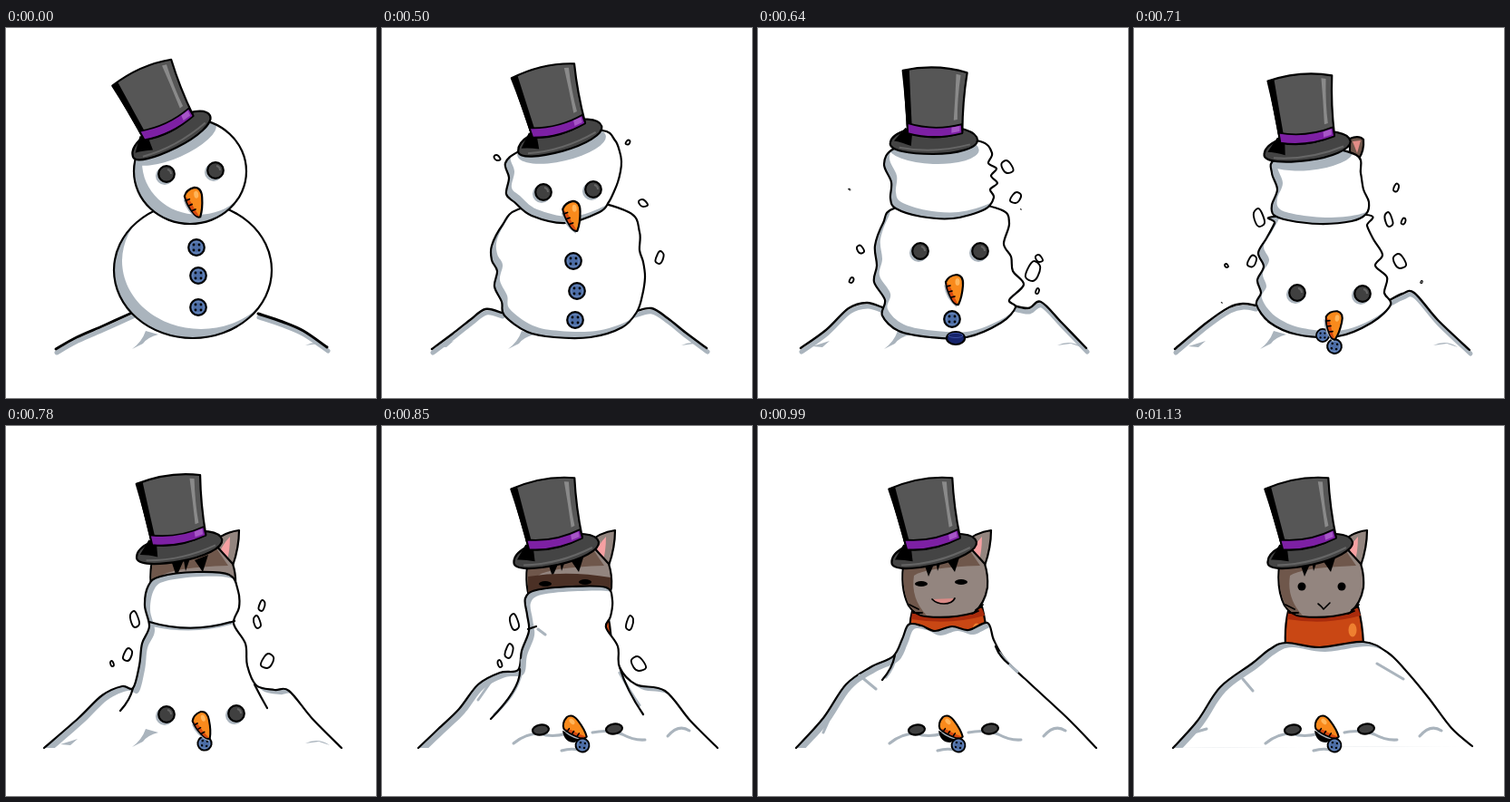
These frames come from a looping animation (408x408 px, 2130 ms). An HTML page:

```html
<!DOCTYPE html>
<html lang="en">
<head>
<meta charset="utf-8">
<title>Melting snowman</title>
<style>
  html, body { margin: 0; width: 100%; height: 100%; overflow: hidden; background: #fff; }
  #stage { width: 408px; height: 408px; overflow: hidden; }
  #strip { display: block; animation: melt 2130ms step-end infinite; }
  /* poses lie side by side: long hold, nine quick steps, long hold */
  @keyframes melt {
    0% { transform: translateX(0); }
    23.4742% { transform: translateX(-408px); }
    26.7606% { transform: translateX(-816px); }
    30.0469% { transform: translateX(-1224px); }
    33.3333% { transform: translateX(-1632px); }
    36.6197% { transform: translateX(-2040px); }
    39.9061% { transform: translateX(-2448px); }
    43.1925% { transform: translateX(-2856px); }
    46.4789% { transform: translateX(-3264px); }
    49.7653% { transform: translateX(-3672px); }
    53.0516% { transform: translateX(-4080px); }
  }
  .ink { fill: none; stroke: #000; stroke-width: 2.2; stroke-linejoin: round; stroke-linecap: round; }
  .shade { fill: none; stroke: #aab4bd; stroke-width: 3; stroke-linejoin: round; stroke-linecap: round; }
</style>
</head>
<body>
<div id="stage"><svg id="strip" width="4488" height="408" viewBox="0 0 4488 408"></svg></div>
<script>
const GRAY = '#aab4bd';
let clips = 0;

const parse = s => s.trim().split(/\s+/).map(p => p.split(',').map(Number));
const mix = (a, b, t = 0.5) => a.map((p, i) => p.map((v, k) => v + (b[i][k] - v) * t));
const oval = (cx, cy, rx, ry) => Array.from({ length: 16 }, (_, i) =>
  [cx + rx * Math.cos(i * Math.PI / 8), cy + ry * Math.sin(i * Math.PI / 8)]);

// Catmull-Rom curve through the points
function smooth(pts, open) {
  const n = pts.length;
  const at = i => open ? pts[Math.max(0, Math.min(n - 1, i))] : pts[(i + n) % n];
  let d = 'M' + pts[0];
  for (let i = 0; i < (open ? n - 1 : n); i++) {
    const [a, b, c, e] = [at(i - 1), at(i), at(i + 1), at(i + 2)];
    const h = [0, 1].map(k => b[k] + (c[k] - a[k]) / 6);
    const j = [0, 1].map(k => c[k] - (e[k] - b[k]) / 6);
    d += `C${[...h, ...j, ...c].map(v => v.toFixed(1))}`;
  }
  return open ? d : d + 'Z';
}

const path = (d, fill) => `<path d="${d}" fill="${fill}"/>`;
const ink = (d, fill = 'none', w = 2.2) =>
  `<path class="ink" d="${d}" style="fill:${fill};stroke-width:${w}"/>`;
const shade = (d, w = 3) => `<path class="shade" d="${d}" style="stroke-width:${w}"/>`;
const place = (x, y, r, body, s = 1) =>
  `<g transform="translate(${x} ${y}) rotate(${r}) scale(${s})">${body}</g>`;

// white mass with a crescent of shade on its left and lower side
function snow(pts, { dx = 6, dy = -7, open = false, extra = '' } = {}) {
  const d = smooth(pts, open), id = 'clip' + clips++;
  return `<clipPath id="${id}"><path d="${d}"/></clipPath><g clip-path="url(#${id})">${path(d, GRAY)}
    <path d="${d}" fill="#fff" transform="translate(${dx} ${dy})"/>${extra}</g>${ink(d)}`;
}
const mound = (s, extra) => snow(parse(s), { dx: 6, dy: 5, open: true, extra });

const line = (s, w = 2.4) => {
  const d = smooth(parse(s), true);
  return `<g transform="translate(1 4)">${shade(d, 5)}</g>` + ink(d, 'none', w);
};
const tufts = path('M139,354Q150,346 154,334L168,338Q156,341 151,348Z', GRAY) +
  path('M330,350Q344,343 357,352L345,348Z', GRAY) + path('M60,351L79,345 71,352Z', GRAY);
const ground = (l, r, w) => tufts + line(l, w) + line(r, w);

const hatArt =
  ink('M-48,4C-46,-9 -22,-14 2,-15C28,-17 47,-12 48,-2C48,7 26,14 0,15C-26,16 -50,13 -48,4Z', '#444') +
  '<path d="M-38,9Q0,15 40,3" fill="none" stroke="#666" stroke-width="2"/>' +
  path('M-32,-13L-44,2Q-36,3 -25,7L-24,-10Z', '#000') +
  ink('M-37,-76Q0,-85 34,-76Q30,-44 31,-10Q0,1 -29,-7Q-32,-44 -37,-76Z', '#565656') +
  path('M-37,-76L-30,-78Q-27,-40 -24,-5L-30,-7Z', '#000') +
  path('M22,-74L27,-73Q24,-46 25,-24L21,-23Q22,-50 22,-74Z', '#8a8a8a') +
  ink('M-30,-18Q0,-10 30,-19L31,-9Q0,0 -29,-7Z', '#7d20a4', 1.8) +
  path('M19,-15L28,-17 28,-11 19,-9Z', '#a656c6');
const hat = (x, y, r) => place(x, y, r, hatArt);
const brimShade = (x, y, r) => place(x, y, r, `<ellipse cy="9" rx="50" ry="17" fill="${GRAY}"/>`);

const eyeArt = `<circle cx="-2" cy="2" r="10" fill="${GRAY}"/>` +
  '<circle class="ink" r="8.8" style="fill:#404040"/><path d="M1,-5Q5,-4 5,0" fill="none" stroke="#666" stroke-width="2"/>';
const eyes = (x1, y1, x2, y2) => place(x1, y1, 0, eyeArt) + place(x2, y2, 0, eyeArt);

const dots = [[-3, -3], [3, -3], [-3, 3], [3, 3]]
  .map(([x, y]) => `<circle cx="${x}" cy="${y}" r="1.4"/>`).join('');
const buttonArt = '<circle class="ink" r="8.8" style="fill:#4c6da6"/>' +
  '<circle r="6.3" fill="none" stroke="#7391c0"/>' + dots;
const button = (x, y, r = 0, s = 1) => place(x, y, r, buttonArt, s);

const carrotArt = path('M-12,-6Q-10,10 2,19L4,10Z', GRAY) +
  ink('M-10,-9Q-7,-16 2,-17Q10,-16 9,-5Q8,8 4,16Q0,17 -4,9Q-9,0 -10,-9Z', '#f98a1c') +
  path('M-9,-8Q-4,-4 -2,4L3,15Q-1,15 -4,8Q-8,0 -9,-8Z', '#d84a10') +
  ink('M-9,-4L-5,-5M-7,2L-3,1M-4,8L0,7', 'none', 1.7) +
  '<ellipse cx="3" cy="-9" rx="2.5" ry="4" fill="#ffb55a"/>';
const carrot = (x, y, r = 0, s = 1) => place(x, y, r, carrotArt, s);

// each flake: x,y,rx,ry
const flakes = s => parse(s).map(([x, y, a, b], i) => {
  const k = i % 2 ? -1 : 1;
  return ink(smooth([[x - k * a, y - b * .5], [x - k * a * .2, y - b], [x + k * a * .5, y - b * .5],
    [x + k * a, y + b * .6], [x, y + b], [x - k * a * .7, y + b * .5]]), '#fff', Math.min(1.9, a));
}).join('');

const rubble = shade('M145,350Q158,339 174,339Q187,344 204,339M232,338Q250,334 265,340Q278,347 290,346M315,342Q327,328 339,336M198,358Q208,355 216,357') +
  [[175, 335], [256, 334]].map(([x, y]) => place(x, y, -8,
    '<ellipse class="ink" rx="9" ry="5.5" style="fill:#404040"/>')).join('') +
  path('M199,336Q201,349 212,349L222,344Z', '#000') + carrot(213, 334, -42, .93) + button(221, 352, 10, .85);

const earArt = ink('M226,130Q240,117 257,115Q257,134 250,154L230,150Z', '#93857f') +
  path('M232,146Q239,130 247,122Q247,138 243,152Z', '#f6a0a2');
const faces = {
  shy: '<ellipse cx="180" cy="174" rx="7" ry="3"/><ellipse cx="224" cy="172" rx="7" ry="3"/>',
  open: '<circle cx="185" cy="177" r="4.5"/><circle cx="229" cy="177" r="4.5"/>' +
    ink('M203,196Q207,199 209,202Q212,199 216,195', 'none', 1.6)
};
faces.smile = faces.shy + ink('M192,191Q197,196 205,196Q214,196 217,190', '#d98a86', 1.7);
const whiskers = ink('M167,197L177,202M171,206L181,206M240,203L248,197M236,207L243,204', 'none', 1.8);

function cat(face) {
  const scarf = 'M170,204Q166,220 167,242Q210,250 253,240Q252,218 247,199Q215,216 170,204Z';
  return ink(scarf, '#c94714') + path('M170,205Q210,216 247,201L250,209Q212,220 169,213Z', '#a92b0c') +
    '<ellipse cx="241" cy="225" rx="4.5" ry="7.5" fill="#ee8030"/>' +
    earArt + ink('M161,148Q156,178 166,198Q173,209 185,210Q212,213 238,206Q250,196 253,178Q254,164 250,152L230,130Z', '#93857f') +
    path('M162,150Q157,178 167,198Q174,208 186,209Q168,190 172,165Q184,156 245,154L230,132Z', '#6f574b') +
    path('M182,148L188,166 196,148 198,160 203,146Z M208,148L217,161 223,142Z', '#000') +
    faces[face] + whiskers;
}

const head1 = parse('243,113 257,124 262,136 264,147 263,158 260,170 256,180 250,192 240,203 203,215 165,207 146,192 137,183 140,165 136,149 151,136 195,118');
const head2 = parse('245,125 258,138 254,149 263,155 257,163 264,171 256,178 260,187 250,200 215,210 180,208 152,199 146,188 147,170 139,150 150,133 195,120');
const body1 = parse('150,200 133,217 121,240 121,256 127,268 124,285 132,302 135,317 160,335 190,341 230,341 265,330 281,313 287,295 290,275 288,258 284,245 284,225 272,203 210,188');
const body2 = parse('150,199 138,215 129,240 131,262 128,280 140,300 137,317 155,334 190,341 230,341 268,325 284,308 277,300 293,283 281,268 279,252 271,238 277,215 267,200 210,190');
const head3 = parse('245,140 250,160 253,178 259,192 256,205 240,213 205,216 170,212 154,206 152,195 158,178 152,160 155,145 195,130');
const body3 = parse('155,208 155,215 146,232 137,248 143,263 136,278 140,292 135,305 150,325 180,338 225,340 262,325 283,305 276,292 279,275 266,262 274,250 264,233 257,218 256,206');

const figure = (body, head, [x, y, r], look) =>
  snow(body, look) + snow(head, { ...look, extra: brimShade(x, y, r) }) + hat(x, y, r);

const lean = '<g transform="translate(0 0)">' + shade('M120,279L131,292M268,262L297,279', 3) + '</g>';

const poses = [
  ground('55,354 78,341 108,328 139,314', '278,315 305,324 328,334 354,352', 3) +
    figure(oval(206, 267, 87, 75), oval(203, 158, 62, 58), [182, 118, -24], { dx: 9, dy: -10 }) +
    eyes(177, 161, 231, 157) + carrot(208, 193, -8) + button(210, 242) + button(212, 273) + button(212, 308),

  ground('55,354 78,337 97,322 114,310 132,314', '278,313 297,309 315,320 335,336 358,353') +
    figure(body1, head1, [196, 121, -13]) +
    eyes(178, 181, 233, 178) + carrot(210, 208, -5) + button(211, 257) + button(215, 290) + button(213, 322) +
    flakes('127,143,3.5,3 271,126,2.5,2.5 288,193,5,4 306,253,4.5,7'),

  ground('51,354 77,335 98,316 117,306 134,311', '278,310 298,309 314,311 335,331 360,353') +
    figure(mix(body1, body2), mix(head1, head2), [195, 122, -5]) +
    eyes(178, 213, 239, 212) + carrot(214, 247, -3) + button(213, 289) + button(215, 316) + button(216, 333) +
    flakes('120,175,3,3 117,235,3,4 273,140,5,5 286,190,6,5 305,260,6,9 310,238,3,3'),

  ground('47,353 75,333 100,309 120,303 137,308', '277,305 298,309 312,302 335,325 362,353') +
    figure(body2, head2, [194, 124, 2]) +
    eyes(179, 246, 245, 246) + carrot(217, 289) + button(214, 321) +
    place(218, 342, 0, '<ellipse class="ink" rx="10" ry="7" style="fill:#16246b"/><ellipse cy="-3" rx="8" ry="2.5" fill="none" stroke="#3b4fa0"/>') +
    flakes('275,153,6.5,7 284,187,6,6 113,244,4,4.5 103,278,2.5,3 101,178,1,1 303,268,8,11 310,254,4,4 308,290,2,3 290,200,.6,.6'),

  ground('45,354 80,325 105,308 120,304 134,306', '282,300 296,293 309,292 335,322 370,355') +
    ink('M238,122Q248,118 253,123Q254,135 248,144L238,142Z', '#6f574b') + path('M241,125L250,124 246,138Z', '#e28c86') +
    figure(body3, head3, [191, 131, -5]) +
    eyes(180, 292, 252, 293) + button(208, 339, 0, .8) + button(221, 351, 10, .9) + carrot(220, 328, 8, .95) +
    flakes('138,209,6,10 130,257,5,6.5 102,262,2,2 289,176,3,4.5 281,211,4.5,8 297,213,2.5,3.5 293,257,7,8 317,280,1.2,1.5 97,303,.6,.6'),

  cat('shy') +
    mound('42,355 80,322 106,297 128,287 140,289 147,264 150,240 158,221 153,198 157,176 170,166 210,161 246,164 256,182 257,200 251,218 264,240 266,264 276,286 296,291 312,292 338,323 370,355') +
    shade('M162,219Q205,229 248,217', 4) + ink('M158,216Q205,230 252,215M140,289Q137,302 126,314M274,285Q281,299 288,311') +
    tufts + eyes(177, 318, 254, 317) + button(219, 350, 8, .87) + carrot(217, 331, -16, .94) + hat(191, 134, -8) +
    flakes('142,213,5,9 134,252,5,7 117,262,2,3 282,198,3.5,6 277,216,4,7 288,259,7,8'),

  cat('shy') + path('M161,166Q205,159 252,167V184H161Z', '#4b3025') + faces.shy +
    mound('40,355 62,334 85,312 106,285 130,272 150,269 154,248 162,226 160,208 158,190 170,181 210,177 247,178 254,192 252,210 247,222 260,243 262,266 280,285 312,292 340,325 370,355') +
    shade('M154,258Q157,288 124,318M120,282L106,302M172,224L180,230M262,272Q274,294 284,308') +
    ink('M161,224L170,221M152,268Q154,288 120,323M262,266Q270,292 288,318') +
    rubble + hat(192, 138, -10) +
    flakes('146,216,5,9 140,248,4.5,8 130,262,2.5,4 273,217,4,8 283,262,8,8'),

  cat('smile') +
    mound('41,355 72,322 101,286 126,269 148,260 157,236 160,215 164,203 180,197 212,201 246,195 254,210 257,231 266,256 282,277 306,288 340,322 372,355') +
    shade('M150,262Q150,280 134,298M122,278L110,296M264,258Q275,278 287,292') +
    ink('M150,259Q150,277 130,302M262,252Q272,278 287,295') +
    rubble + hat(193, 138, -10) + flakes('138,244,4,6 277,249,4,6'),

  cat('smile') +
    mound('42,355 72,322 97,285 124,266 149,254 159,235 166,219 180,220 195,226 214,221 232,225 253,217 260,236 273,258 300,284 340,321 373,355') +
    shade('M152,254Q150,266 141,277M112,275L130,290M80,320L72,338M266,250Q276,263 286,271') +
    ink('M151,252Q149,266 137,280M262,243Q266,254 276,262') + rubble + hat(194, 138, -10),

  cat('open') +
    mound('42,355 71,324 96,287 127,264 149,250 160,236 168,230 188,235 210,231 232,235 253,228 264,243 278,255 300,277 332,309 373,354') +
    lean + shade('M80,320L72,338') + rubble + hat(194, 138, -10),

  cat('open') +
    mound('43,355 70,325 95,288 130,262 150,246 168,239 205,244 253,238 280,250 300,270 325,300 350,333 373,353') +
    lean + shade('M66,338L80,334') + rubble + hat(194, 138, -10)
];

document.getElementById('strip').innerHTML =
  poses.map((p, i) => `<g transform="translate(${i * 408})">${p}</g>`).join('');
</script>
</body>
</html>
```
